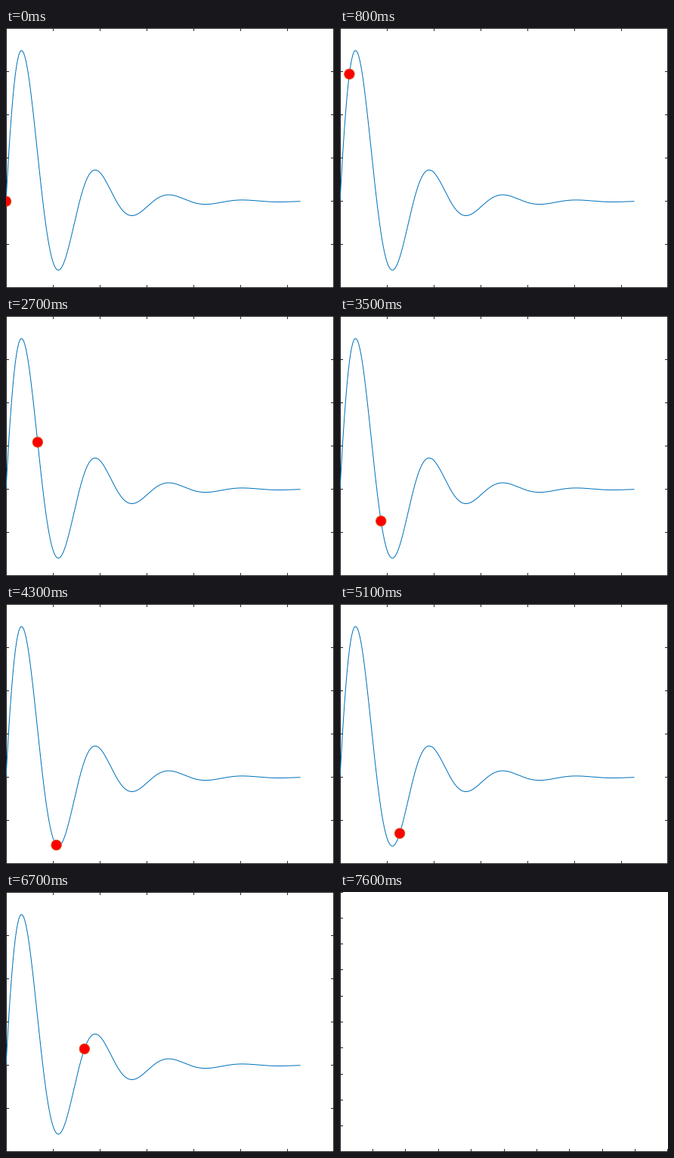
Animation, 434 px wide and 343 px high, one loop 7.7 s. Source, as a matplotlib script:

```python
import numpy as np
import matplotlib.pyplot as plt
from matplotlib.animation import FuncAnimation
from matplotlib.collections import LineCollection
from matplotlib.patches import Circle

W, H, DPI = 434, 343, 64
PX = 72 / DPI            # one pixel in points
FRAMES, DT = 77, 0.025
TICK = 4
INK = "#262626"

fig = plt.figure(figsize=(W / DPI, H / DPI), dpi=DPI, facecolor="white")
ax = fig.add_axes([0, 0, 1, 1])
ax.set(xlim=(0, W), ylim=(H, 0))
ax.axis("off")


def to_px(t):
    """Damped wave on axes spanning 0..7 by -2..4, in pixels."""
    y = 5 * np.exp(-t) * np.sin(4 * t)
    return t * W / 7, (4 - y) * H / 6


def centers(n, size):
    """Pixel centres of n + 1 evenly spaced ticks."""
    return [min(int(i * size / n), size - 1) + 0.5 for i in range(n + 1)]


def axes_lines(nx, ny, box):
    """Axis lines with inward ticks, on all four sides if box is set."""
    left, right, top, bottom = 0.5, W - 0.5, 0.5, H - 0.5
    segs = [[(left, 0), (left, H)], [(0, bottom), (W, bottom)]]
    segs += [[(x, H), (x, H - TICK)] for x in centers(nx, W)]
    segs += [[(0, y), (TICK, y)] for y in centers(ny, H)]
    if box:
        segs += [[(right, 0), (right, H)], [(0, top), (W, top)]]
        segs += [[(x, 0), (x, TICK)] for x in centers(nx, W)]
        segs += [[(W, y), (W - TICK, y)] for y in centers(ny, H)]
    lines = LineCollection(segs, colors=INK, linewidths=PX,
                           capstyle="butt", zorder=1)
    lines.set_snap(False)
    return ax.add_collection(lines, autolim=False)


plot_axes = axes_lines(7, 6, box=True)
empty_axes = axes_lines(10, 10, box=False)

curve, = ax.plot(*to_px(np.arange(0, 2 * np.pi, DT)), color="#0072BD",
                 lw=PX, zorder=2, scalex=False, scaley=False)
dot = ax.add_patch(Circle(to_px(0), 6.67, facecolor="red",
                          edgecolor="#D95319", lw=PX, zorder=3))


def update(i):
    cleared = i == FRAMES - 1
    for artist in (plot_axes, curve, dot):
        artist.set_visible(not cleared)
    empty_axes.set_visible(cleared)
    dot.center = to_px(i * DT)
    return plot_axes, empty_axes, curve, dot


anim = FuncAnimation(fig, update, frames=FRAMES, interval=100,
                     repeat=True, repeat_delay=0)
plt.show()
```
